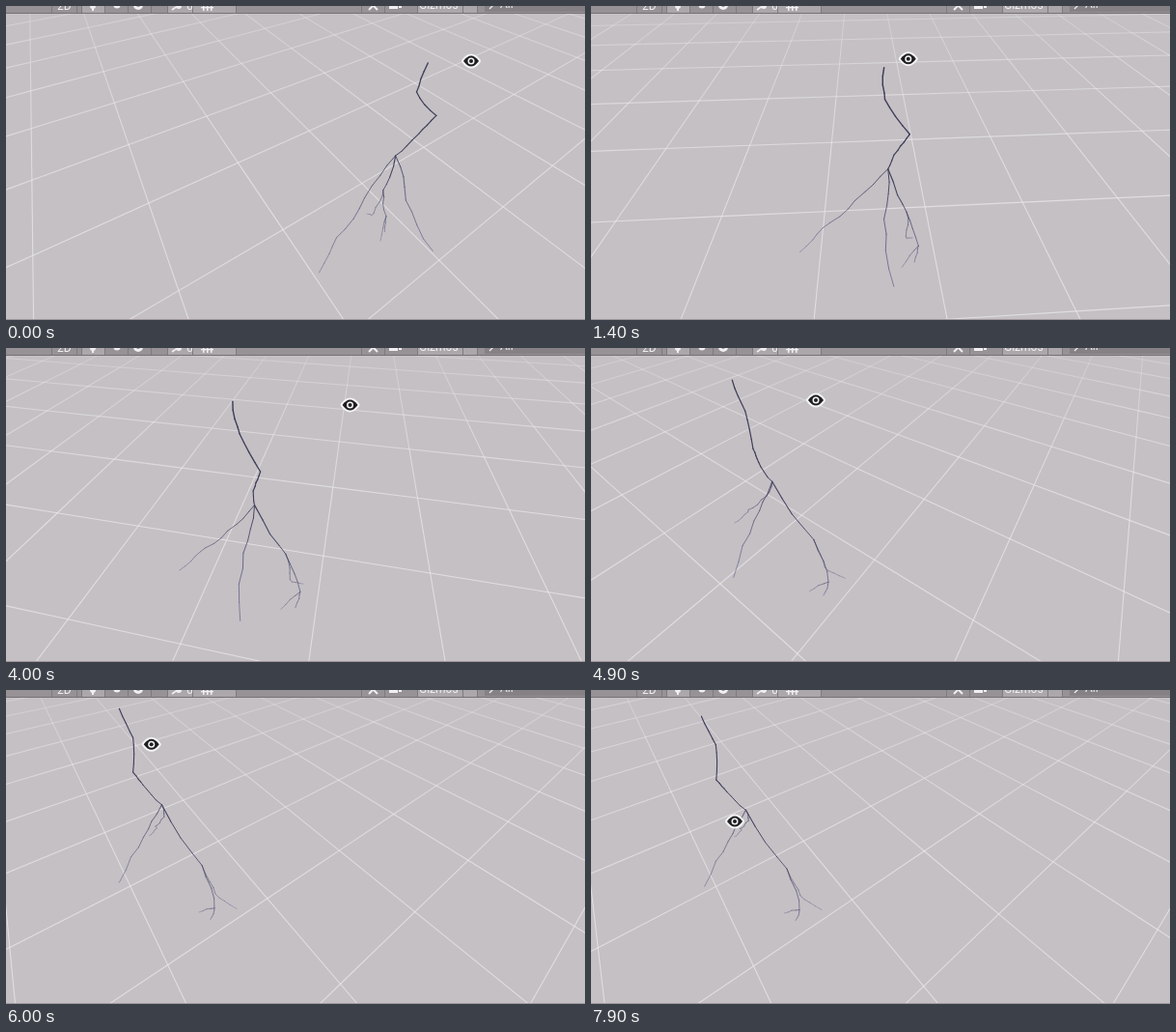
These frames come from a looping animation (600 px wide and 325 px high, 8 s). An HTML page with a canvas:

```html
<!DOCTYPE html>
<html lang="en">
<head>
<meta charset="utf-8">
<style>
  html, body { margin: 0; width: 600px; height: 325px; overflow: hidden; background: #c4c0c4; }
  canvas { display: block; }
</style>
</head>
<body>
<canvas id="stage" width="600" height="325"></canvas>
<script>
const ctx = document.getElementById('stage').getContext('2d');
const LOOP = 8000, STEP = 100, FOCAL = 275, DIST = 3.21, GROUND = 0.136;
const DRAG = 0.195; // degrees of yaw per pixel dragged
const LIGHT = '#f1eff1', DARK = '#1f1e21';
const rad = deg => deg * Math.PI / 180;
const linear = u => u, easeIn = u => u * u;

// Pointer moves; those that set a pitch also drag the camera around
const moves = [
  { from: 0, to: 1800, x: 285, y: 54, pitch: 47.6 },
  { from: 2300, to: 2800, x: 300, y: 215 },
  { from: 3300, to: 3700, x: 384, y: 60 },
  { from: 3800, to: 4900, x: 233, y: 54, pitch: 47.4 },
  { from: 4900, to: 5500, x: 175, y: 52, pitch: 47 },
  { from: 5500, to: 6200, x: 141, y: 58, pitch: 48.8 },
  { from: 6300, to: 7200, x: 149, y: 139, pitch: 49.6, ease: easeIn },
  { from: 7300, to: 7400, x: 149, y: 136 },
  { from: 7600, to: 7900, x: 149, y: 136, pitch: 49.9 }
];

function poseAt(t) {
  const pose = { x: 482, y: 57, yaw: -33, pitch: 49.9 };
  for (const { from, to, x, y, pitch, ease = linear } of moves) {
    if (t <= from) break;
    const u = ease(Math.min(1, (t - from) / (to - from)));
    const dx = (x - pose.x) * u;
    pose.x += dx;
    pose.y += (y - pose.y) * u;
    if (pitch) {
      pose.yaw -= dx * DRAG;
      pose.pitch += (pitch - pose.pitch) * u;
    }
  }
  return pose;
}

// Bolt in space: right, forward, up from the orbit pivot
const fork = [.04, -1.15, 1.26], bend = [.19, -1.08, .7], low = [.32, -1.14, .26];
const branches = [
  { w: 1.6, pts: [[.012, -1.135, 1.86], [.017, -1.134, 1.71], [.132, -1.219, 1.58],
    [.085, -1.2, 1.46], fork] },
  { w: 1.5, pts: [fork, [.017, -1.35, 1.05], [.073, -1.64, .8]] },
  { w: 1.4, pts: [fork, [-.164, -1.186, 1], [-.395, -1.243, .76], [-.579, -1.332, .57]] },
  { w: 2, pts: [fork, bend, low, [.296, -1.211, .09]] },
  { w: 1.4, pts: [bend, [.215, -1.072, .3], [.307, -.95, .03]] },
  { w: 1.4, pts: [low, [.182, -1.266, .12]] }
];

let seed = 11;
const random = () => (seed = seed * 16807 % 2147483647) / 2147483647 - 0.5;

// Insert a displaced midpoint in every span
function roughen(pts) {
  return pts.flatMap((p, i) => {
    if (!i) return [p];
    const q = pts[i - 1], size = 0.1 * Math.hypot(...p.map((v, k) => v - q[k]));
    return [p.map((v, k) => (v + q[k]) / 2 + size * random()), p];
  });
}
for (const b of branches) b.pts = roughen(roughen(b.pts));

function camera(yaw, pitch) {
  const cy = Math.cos(rad(yaw)), sy = Math.sin(rad(yaw));
  const cp = Math.cos(rad(pitch)), sp = Math.sin(rad(pitch));
  return ([a, b, up]) => {
    const x = a * cy + b * sy, w = b * cy - a * sy;
    const z = DIST + w * cp - up * sp;
    return [300 + FOCAL * x / z, 166 - FOCAL * (w * sp + up * cp) / z, z];
  };
}

function segment(p, q, color, width) {
  ctx.strokeStyle = color;
  ctx.lineWidth = width;
  ctx.beginPath();
  ctx.moveTo(p[0], p[1]);
  ctx.lineTo(q[0], q[1]);
  ctx.stroke();
}

function drawGrid(see) {
  const link = (a, b) => {
    const p = see(a), q = see(b);
    if (p[2] < 0.3 || q[2] < 0.3) return;
    const alpha = Math.max(0, Math.min(0.65, 0.95 - (p[2] + q[2]) * 0.055));
    segment(p, q, `rgba(240,239,241,${alpha})`, 1.1);
  };
  for (let i = -12; i <= 12; i++) {
    for (let j = -12; j <= 12; j++) {
      const c = i + 0.41, e = j + 0.31;
      link([c, e, GROUND], [c + 1, e, GROUND]);
      link([c, e, GROUND], [c, e + 1, GROUND]);
    }
  }
}

function drawBolt(see) {
  ctx.lineCap = 'round';
  branches.forEach(({ w, pts }, n) => {
    const seen = pts.map(see);
    for (let i = 1; i < seen.length; i++) {
      const u = n ? i / seen.length : 0;
      const color = `rgb(${62 + 50 * u},${61 + 48 * u},${88 + 62 * u})`;
      segment(seen[i - 1], seen[i], color, w * (1 - 0.25 * u) / seen[i][2]);
    }
  });
  ctx.lineCap = 'butt';
}

function dot(x, y, r, color) {
  ctx.fillStyle = color;
  ctx.beginPath();
  ctx.arc(x, y, r, 0, 7);
  ctx.fill();
}

function drawEye(x, y) {
  ctx.beginPath();
  ctx.moveTo(x - 8, y);
  ctx.quadraticCurveTo(x, y - 11, x + 8, y);
  ctx.quadraticCurveTo(x, y + 11, x - 8, y);
  ctx.closePath();
  ctx.lineJoin = 'round';
  ctx.lineWidth = 4;
  ctx.strokeStyle = '#f6f5f6';
  ctx.stroke();
  ctx.fillStyle = DARK;
  ctx.fill();
  dot(x, y, 3.5, '#f6f5f6');
  dot(x, y, 2, DARK);
}

function box(x, y, w, h, color) {
  ctx.fillStyle = color;
  ctx.fillRect(x, y, w, h);
}

function label(text, x, y) {
  ctx.font = '12px Roboto, sans-serif';
  ctx.fillStyle = LIGHT;
  ctx.fillText(text, x, y);
}

function button(x, w, color) {
  box(x, 0, w, 7, color);
  box(x, 0, 1, 7, '#7e7a7e');
  box(x + w, 0, 1, 7, '#7e7a7e');
}

function drawToolbar() {
  const plain = '#969296', lit = '#aba7ab';
  box(0, 0, 600, 8, plain);
  for (let i = 0; i < 3; i++) button(78 + i * 24, 24, i ? plain : lit);
  button(47, 26, plain);
  button(167, 26, lit);
  button(193, 45, lit);
  button(368, 24, plain);
  button(426, 47, lit);
  button(473, 15, lit);
  box(496, 0, 104, 6, '#858185');
  box(0, 7, 600, 1, '#757175');

  label('2D', 53, 4);
  label('6', 187, 4);
  label('Gizmos', 428, 3);
  label('All', 512, 2);

  dot(90, 0, 3, LIGHT);
  box(89, 2, 2, 3, LIGHT);
  dot(115, -1, 3.5, LIGHT);
  dot(137, -1, 5, LIGHT);
  dot(137, -1, 2, plain);
  segment([172, 4], [182, -3], LIGHT, 1.6);
  dot(179, 0, 3, LIGHT);
  for (let x = 204; x < 214; x += 4) box(x, 0, 1.5, 5, LIGHT);
  box(202, 1, 13, 1.3, LIGHT);
  segment([376, 4], [384, -4], LIGHT, 2);
  segment([385, 4], [377, -4], LIGHT, 2);
  box(397, 0, 9, 3, LIGHT);
  box(407, 0, 3, 2, LIGHT);
  segment([501, 3], [505, -1], LIGHT, 1.3);
}

function draw(t) {
  const { x, y, yaw, pitch } = poseAt(t);
  box(0, 0, 600, 325, '#c4c0c4');
  drawGrid(camera(yaw, pitch));
  drawBolt(camera(yaw + 3, pitch));
  drawToolbar();
  box(0, 324, 600, 1, '#9f979c');
  drawEye(x, y);
}

const start = performance.now();
function tick() {
  const t = (performance.now() - start) % LOOP;
  draw(Math.floor(t / STEP) * STEP);
  requestAnimationFrame(tick);
}
tick();
</script>
</body>
</html>
```
